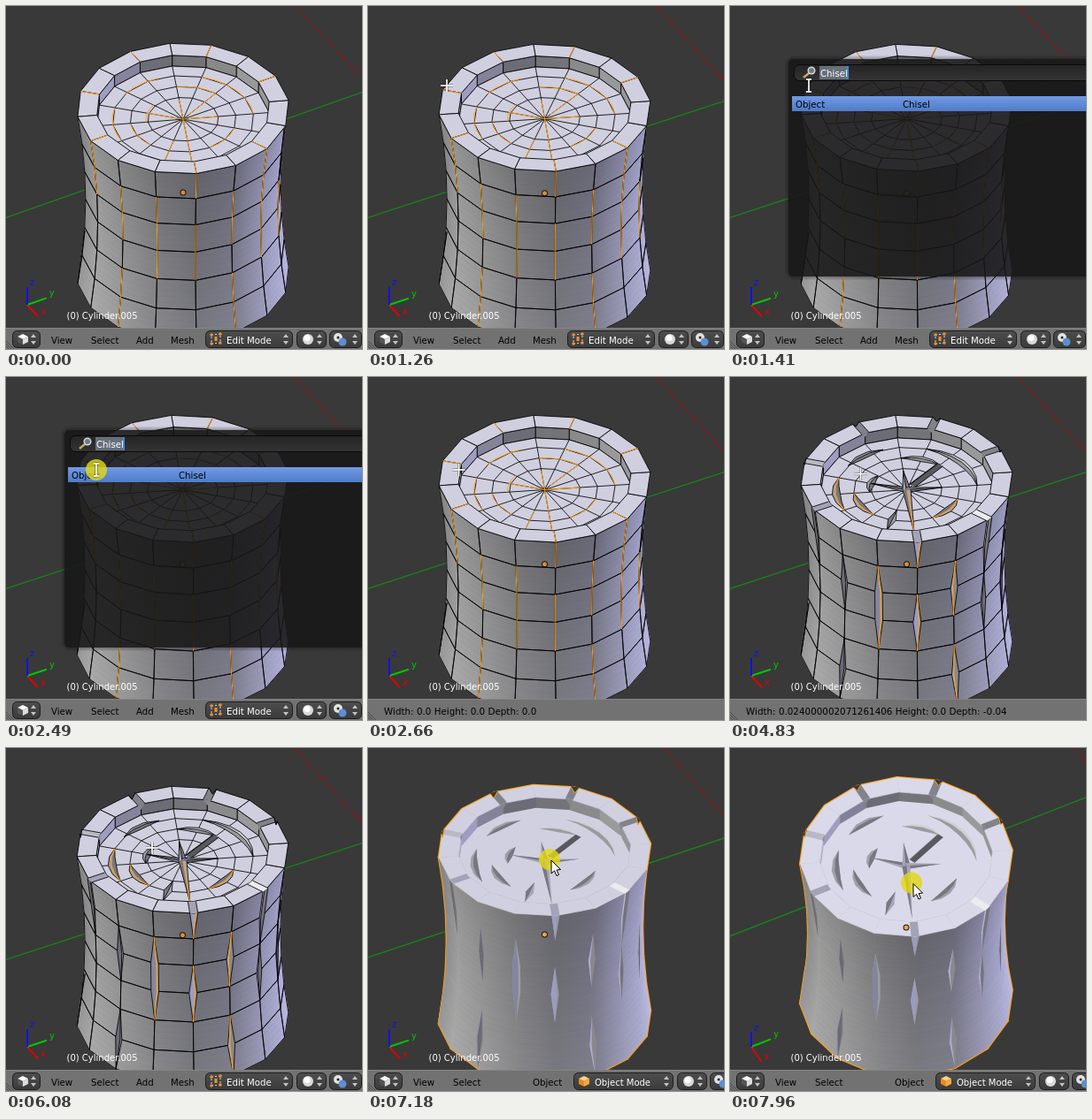
An HTML page with a canvas that plays this animation: 402 by 388 pixels, repeating every 8000 ms.

```html
<!DOCTYPE html>
<html lang="en">
<head>
<meta charset="utf-8">
<title>Chisel tool</title>
<style>
html, body { margin: 0; width: 100%; height: 100%; overflow: hidden; background: #393939; }
canvas { display: block; }
</style>
</head>
<body>
<canvas id="stage" width="402" height="388"></canvas>
<script>
const g = document.getElementById('stage').getContext('2d');
const LOOP = 8000, RAD = Math.PI / 180, STEP = 22.5;
const ORANGE = '#ffa010', BG = '#393939', FONT = '"DejaVu Sans", sans-serif', WIRE = 0.85;
const TOP = 121, CAP = 105.5, INNER = 98, RIM = 120;
const CAP_RINGS = [98, 80, 60, 40];

// Selected edges: body [column, ring, ring], cap arcs [radius, column, column], cap spokes [column, r, r, flat]
const BODY = [[-3, 0, 2], [-2, 1, 3], [-2, 4, 6], [-1, 1, 4], [0, 0, 1], [0, 2, 4],
  [1, 1, 3], [1, 4, 6], [2, 0, 2], [2, 2, 4], [3, 2, 4]];
const ARCS = [[80, -7.4, -5.8], [80, 4, 7], [60, 6, 8], [80, -5, -3], [60, -4, -2], [42, -6, -4], [60, 1, 3]];
const SPOKES = [[-1, 40, 78], [-5, 0, 42], [-8, 0, 36], [4, 0, 40], [0, 0, 80], [6, 10, 60, 1]];
const RIMS = [-7, -5, 7, 5, -3, 0, 2];

// Moments at which the picture may change
const TICKS = [0];
[[150, 1090, 7], [1260, 1410, 2], [1720, 2190, 4], [2490, 2660, 2], [3120, 3900, 6], [4360, 4360, 1],
  [4830, 4980, 2], [5450, 5600, 2], [6080, 6700, 5], [7020, 7960, 7]].forEach(([a, b, n]) => {
  for (let i = 0; i < n; i++) TICKS.push(n > 1 ? a + (b - a) * i / (n - 1) : a);
});

const MOUSE = [[1260, 89, 90], [1410, 89, 90], [1720, 66, 76], [2190, 101, 105], [3120, 104, 105],
  [3580, 121, 105], [3900, 132, 107], [4980, 150, 110], [5600, 165, 113], [6080, 165, 113], [6700, 205, 123]];

// Light around the view axis: [angle, r, g, b]
const LIGHT = [[-90, 136, 136, 139], [-60, 160, 160, 160], [-30, 140, 140, 141], [-5, 116, 116, 120],
  [15, 106, 106, 116], [30, 117, 117, 133], [55, 152, 152, 186], [90, 178, 178, 222]];

const mix = (a, b, s) => a + (b - a) * s;
function track(keys, x) {
  if (x <= keys[0][0]) return keys[0].slice(1);
  for (let i = 1; i < keys.length; i++) {
    const a = keys[i - 1], b = keys[i];
    if (x <= b[0]) return a.slice(1).map((v, n) => mix(v, b[n + 1], (x - a[0]) / (b[0] - a[0])));
  }
  return keys[keys.length - 1].slice(1);
}
function shade(deg, z = 0) {
  deg = ((deg + 540) % 360) - 180;
  return 'rgb(' + track(LIGHT, deg).map(c => Math.round(c - z * 0.09)) + ')';
}

let elev, turn, sinE, cosE, cx, cy;
function setView(e, b) {
  elev = e; turn = b;
  sinE = Math.sin(e * RAD); cosE = Math.cos(e * RAD);
  cx = 200 - (29.7 - b) * 0.45;
  cy = 161.5 + 63 * cosE;
}
const angle = k => turn - STEP + STEP * k;
// Cylinder point; v shifts it sideways along the tangent
function P(r, k, z, v = 0) {
  const a = angle(k) * RAD, s = Math.sin(a), c = Math.cos(a);
  return [cx + r * s + v * c, cy - z * cosE + (r * c - v * s) * sinE];
}
const ringZ = j => TOP - 40 * j;
const ringR = j => 111 + 9 * ((j - 3) / 3) ** 2;
const B = (j, k, v) => P(ringR(j), k, ringZ(j), v);
const circle = (r, z) => Array.from({ length: 16 }, (_, k) => P(r, k, z));

function trace(pts, closed = true) {
  g.beginPath();
  pts.forEach(p => g.lineTo(p[0], p[1]));
  if (closed) g.closePath();
}
function fill(pts, color) { trace(pts); g.fillStyle = color; g.fill(); }
function line(pts, color, w = 1, closed = false) {
  trace(pts, closed);
  g.strokeStyle = color; g.lineWidth = w; g.stroke();
}
const wire = (pts, closed) => line(pts, '#000', WIRE, closed);
function disc(x, y, r, color) {
  g.beginPath(); g.arc(x, y, r, 0, 7); g.fillStyle = color; g.fill();
}
function text(s, x, y, color, size = 10.2) {
  g.font = size + 'px ' + FONT; g.fillStyle = color; g.fillText(s, x, y);
}

function axes() {
  const b = turn * RAD, w = (turn + 22.1) * RAD;
  const ox = cx + 345 * Math.cos(w), oy = cy + 64 * cosE - 345 * Math.sin(w) * sinE;
  const along = (dx, dy, color) => line([[ox - 900 * dx, oy - 900 * dy], [ox + 900 * dx, oy + 900 * dy]], color, 1.2);
  along(Math.cos(b), -Math.sin(b) * sinE, '#148a14');
  g.setLineDash([16, 4]);
  along(Math.sin(b), Math.cos(b) * sinE, '#8e1416');
  g.setLineDash([]);
}

// Groove between two edges with a two-tone floor split along mid
function groove(left, mid, right, dark, light, edit, glow) {
  fill(left.concat(right.slice().reverse()), light);
  fill(left.concat(mid.slice().reverse()), dark);
  if (!edit) return;
  wire(left); wire(right);
  line(mid, glow ? ORANGE : '#000', glow ? 1.2 : WIRE);
}
// at(i, v) gives point i moved sideways by v
function sliver(n, at, width, skew, dark, light, edit, glow) {
  const row = f => Array.from({ length: n }, (_, i) => at(i, width(i) * f));
  groove(row(-1), row(skew), row(1), dark, light, edit, glow);
}

function drawCap(s, top) {
  const lip = circle(INNER, TOP), flush = s.d < 0.5;
  g.save();
  trace(lip); g.clip();
  for (let k = 0; k < 16; k++) {
    const tone = shade(angle(k) + 180 + STEP / 2);
    const q = [P(INNER, k, TOP), P(INNER, k + 1, TOP), P(INNER, k + 1, CAP), P(INNER, k, CAP)];
    fill(q, tone);
    line(q, s.edit ? '#000' : tone, s.edit ? WIRE : 0.6, true);
  }
  fill(circle(INNER, CAP), top);
  if (s.edit) {
    CAP_RINGS.forEach(r => wire(circle(r, CAP), true));
    for (let k = 0; k < 16; k++) wire([P(0, 0, CAP), P(INNER, k, CAP)]);
  }
  ARCS.forEach(([r, a, b]) => {
    const n = Math.round((b - a) * 2) + 1, kAt = i => mix(a, b, i / (n - 1));
    if (!s.w) return line(Array.from({ length: n }, (_, i) => P(r, kAt(i), CAP)), ORANGE);
    const pale = a > 3, tones = flush ? ['#a9a8b4', '#bab9c6'] : pale ? ['#9a9aa0', '#cfcfd2'] : ['#77777f', '#a0a0ac'];
    sliver(n, (i, v) => P(r + v, kAt(i), CAP), i => s.w * Math.sin(Math.PI * i / (n - 1)),
      0.2, ...tones, s.edit, flush || (!pale && a > -6));
  });
  SPOKES.forEach(([k, a, b, flat]) => {
    if (!s.w) return line([P(a, k, CAP), P(b, k, CAP)], ORANGE);
    const w = i => flat ? s.w * 0.9 : a ? (i === 1 ? s.w : 0) : s.w * (1 - i / 2);
    const tones = flush ? ['#a9a8b4', '#bab9c6'] : [flat ? '#58585e' : '#77777f', '#a5a5b8'];
    sliver(3, (i, v) => P(mix(a, b, i / 2), k, CAP, v), w, flat ? 0.8 : 0.1, ...tones, s.edit, flush || !k);
  });
  g.restore();
}

function rimTone(k, cut) {
  if (!cut) return '#bab9c6';
  if (k === 2) return '#ebebf0';
  if (k === -5) return '#b9b9c4';
  return Math.abs(k) > 3 ? '#82828a' : '#a3a3b8';
}
function drawRim(s, top) {
  for (let k = 0; k < 16; k++) {
    const q = [P(RIM, k, TOP), P(RIM, k + 1, TOP), P(INNER, k + 1, TOP), P(INNER, k, TOP)];
    fill(q, top);
    line(q, s.edit ? '#000' : top, s.edit ? WIRE : 0.7, true);
  }
  RIMS.forEach(k => {
    const far = Math.cos(angle(k) * RAD) < 0, w = s.w;
    if (!w) return line([P(RIM, k, TOP), P(INNER, k, TOP)], ORANGE);
    const end = (r, v) => P(r, k, TOP, v);
    const drop = TOP - 8 * s.d;
    fill([end(RIM, -w), end(RIM, w), end(INNER, w), end(INNER, -w)], rimTone(k, s.d));
    if (s.d && far) {
      const bite = [end(RIM, -w), P(RIM, k, drop), end(RIM, w)];
      fill([end(INNER, -w), P(INNER, k, drop), end(INNER, w)], '#85858e');
      fill(bite, BG);
      line([end(RIM, -w), end(RIM, w)], BG, 2);
      line(bite, s.edit ? '#000' : ORANGE);
    }
    if (s.edit) {
      [-w, w].forEach(v => wire([end(RIM, v), end(INNER, v)]));
      if (s.d < 0.5) line([end(RIM, 0), end(INNER, 0)], ORANGE, 1.2);
    }
  });
}

// Horizontal gradient in thin strips, so the light also runs smoothly down the side
function drawQuad(j, k) {
  const n = 5;
  for (let i = 0; i < n; i++) {
    const a = j + i / n, b = a + 1 / n, at = (y, x) => {
      const p = B(j, x), q = B(j + 1, x);
      return [mix(p[0], q[0], y - j), mix(p[1], q[1], y - j)];
    };
    const q = [at(a, k), at(a, k + 1), at(b, k + 1), at(b, k)], z = ringZ((a + b) / 2);
    const paint = g.createLinearGradient((q[0][0] + q[3][0]) / 2, 0, (q[1][0] + q[2][0]) / 2, 0);
    paint.addColorStop(0, shade(angle(k), z));
    paint.addColorStop(1, shade(angle(k + 1), z));
    fill(q, paint);
    line(q, paint, 0.7, true);
  }
}

function drawBody(s) {
  const quads = [];
  for (let j = 5; j >= 0; j--) for (let k = -8; k < 8; k++) {
    const q = [B(j, k), B(j, k + 1), B(j + 1, k + 1), B(j + 1, k)];
    const [a, , c] = q, area = (c[0] - a[0]) * (q[3][1] - q[1][1]) - (c[1] - a[1]) * (q[3][0] - q[1][0]);
    if (area > 0) quads.push([q, j, k]);
  }
  if (!s.edit) {
    quads.forEach(([q]) => line(q, ORANGE, 2.8, true));
    line(circle(RIM, TOP), ORANGE, 2.8, true);
  }
  quads.forEach(([, j, k]) => drawQuad(j, k));
  if (s.edit) quads.forEach(([q]) => wire(q, true));
  BODY.forEach(([k, a, b]) => {
    const n = b - a + 1, deg = angle(k), side = k > 0 ? -1 : 1;
    if (!s.w) return line(Array.from({ length: n }, (_, i) => B(a + i, k)), ORANGE);
    const width = i => (i > 0 && i < n - 1) || (i === 0 && a === 0) ? s.w : 0;
    const main = s.d ? shade(deg + 62 * side, 60) : shade(deg, 80);
    const other = s.d ? shade(deg - 50 * side, -40) : shade(deg, 20);
    // once cut deep, the floor shows only when seen head-on
    const glow = s.d < 0.5 || Math.abs(deg) < 35;
    sliver(n, (i, v) => B(a + i, k, v), width, side * 0.45,
      side > 0 ? main : other, side > 0 ? other : main, s.edit, glow);
  });
}

function gizmo() {
  const b = turn * RAD, x = 24, y = 338, n = 25;
  [['x', Math.sin(b), Math.cos(b) * sinE, '#e00000'],
    ['y', Math.cos(b), -Math.sin(b) * sinE, '#00c800'],
    ['z', 0, -cosE, '#1010f8']].forEach(([name, dx, dy, color]) => {
    line([[x, y], [x + n * dx, y + n * dy]], color, 2);
    text(name, x + n * dx + 3, y + n * dy - 2, color, 10);
  });
}

function box(x, y, w, h, r, top, bottom, edge) {
  const paint = g.createLinearGradient(0, y, 0, y + h);
  paint.addColorStop(0, top); paint.addColorStop(1, bottom);
  g.beginPath(); g.roundRect(x, y, w, h, r);
  g.fillStyle = paint; g.fill();
  if (edge) { g.strokeStyle = edge; g.lineWidth = 1; g.stroke(); }
}
function button(x, w) {
  box(x + 0.5, 367.5, w, 19, 5, '#4d4d4d', '#3b3b3b', '#1d1d1d');
  const ax = x + w - 7;
  fill([[ax - 3, 375], [ax + 3, 375], [ax, 371]], '#c4c4c4');
  fill([[ax - 3, 379], [ax + 3, 379], [ax, 383]], '#c4c4c4');
}
function cube(x, y, r, a, b, c) {
  const h = r / 2;
  fill([[x, y - r], [x + r, y - h], [x, y], [x - r, y - h]], a);
  fill([[x - r, y - h], [x, y], [x, y + r], [x - r, y + h]], b);
  fill([[x + r, y - h], [x, y], [x, y + r], [x + r, y + h]], c);
}
function header(s) {
  g.fillStyle = '#727272'; g.fillRect(0, 364, 402, 24);
  g.fillStyle = '#858585'; g.fillRect(0, 364, 402, 1);
  for (let i = 0; i < 3; i++) line([[0, 379 + i * 3], [9 - i * 3, 388]], '#4e4e4e');
  if (s.op) return text(s.op, 18, 382, '#000', 10.36);
  button(7, 31);
  cube(19, 377, 6, '#fff', '#555', '#ddd');
  text('View', 51, 382, '#000');
  text('Select', 96, 382, '#000');
  if (s.edit) text('Add', 147, 382, '#000');
  text(s.edit ? 'Mesh' : 'Object', 186, 382, '#000');
  const x = s.edit ? 225 : 232, w = s.edit ? 98 : 112;
  button(x, w);
  if (s.edit) {
    const q = [[232, 372], [242, 371], [242, 381], [232, 382]];
    g.setLineDash([2, 2]);
    line(q, '#d8d8d8', 1, true);
    g.setLineDash([]);
    q.forEach(p => disc(p[0], p[1], 1.7, '#f09030'));
    line([[237, 374], [237, 379]], '#f09030', 3);
  } else cube(244, 377, 6, '#ffd08a', '#e88a20', '#f7a840');
  text(s.edit ? 'Edit Mode' : 'Object Mode', x + 24, 382, '#fff', s.edit ? 10.2 : 10);
  const sx = x + w + 5;
  button(sx, 33);
  disc(sx + 13, 377, 6, '#d9d9d9'); disc(sx + 12, 375.5, 3.5, '#fff');
  button(sx + 37, 36);
  disc(sx + 47, 375, 5, '#e4e4e4');
  disc(sx + 52, 380, 4.5, '#5c8fd0'); disc(sx + 47, 375, 1.5, '#222');
}

function popup() {
  for (let i = 4; i > 0; i--) box(66 - i, 60 - i, 400, 246 + 2 * i, 6 + i, 'rgba(0,0,0,.07)', 'rgba(0,0,0,.07)');
  box(66, 60, 400, 246, 5, 'rgba(24,24,24,.85)', 'rgba(24,24,24,.85)');
  box(72.5, 66.5, 400, 18, 6, '#242424', '#343434', '#0a0a0a');
  line([[83, 81], [89, 76]], '#c9a265', 2.5);
  disc(92, 73, 4.5, '#d8d8d8'); disc(92, 73, 3, '#6c7a86');
  g.fillStyle = '#66707c'; g.fillRect(101, 68, 32, 15);
  g.fillStyle = '#3f85e0'; g.fillRect(132, 68, 2, 15);
  text('Chisel', 102, 80, '#fff');
  box(70, 102, 400, 17, 0, '#7299e4', '#4f7cc8');
  text('Object', 74, 115, '#000');
  text('Chisel', 195, 115, '#000');
}

function pointer(s) {
  if (!s.mouse) return;
  const [x, y] = s.mouse;
  if (s.press) disc(x, y, 12, 'rgba(226,216,22,.82)');
  if (s.arrow) {
    const p = [[0, 0], [0, 15], [3.5, 11.8], [6, 17.5], [8.5, 16.4], [6, 11], [10.5, 10.5]].map(([a, b]) => [x + 2 + a, y + 1 + b]);
    fill(p, '#fff'); line(p, '#000', 1, true);
    return;
  }
  const bars = s.beam
    ? [[[x, y - 7], [x, y + 7]], [[x - 3, y - 7], [x + 3, y - 7]], [[x - 3, y + 7], [x + 3, y + 7]]]
    : [[[x - 7, y], [x + 7, y]], [[x, y - 7], [x, y + 7]]];
  bars.forEach(b => line(b, 'rgba(0,0,0,.5)', 3));
  bars.forEach(b => line(b, '#fff', 1.7));
}

function state(t) {
  const s = { edit: t < 6540, w: 0, d: 0 };
  if (t < 1260) {
    const u = Math.min(1, t / 1090), k = u * u * (3 - 2 * u);
    setView(mix(38.2, 37, k), mix(29.7, 28.6, k));
  } else {
    const k = t < 7000 ? 0 : ((t - 6860) / 1100) ** 1.83;
    setView(37 + 11.8 * k, 28.6 - 1.2 * k);
    s.mouse = track(MOUSE, t);
    s.mouse[1] += 29.5 * k;
  }
  s.popup = t >= 1400 && t < 2650;
  s.beam = s.popup;
  s.arrow = !s.edit;
  s.press = (t >= 2480 && t < 2650) || t >= 7000;
  if (t >= 2650) {
    const px = Math.max(0, Math.min(24, Math.round(s.mouse[0] - 102)));
    s.w = t < 3100 ? 0 : px / 19 * 3.6;
    s.d = t < 4350 ? 0 : t < 4820 ? 0.4 : t < 4970 ? 0.7 : 1;
    if (t < 5590) {
      const width = t < 3100 ? '0.0' : Math.fround(px * 0.001 + 1.25e-9);
      s.op = 'Width: ' + width + ' Height: 0.0 Depth: ' + (s.d ? '-0.04' : '0.0');
    }
  }
  return s;
}

function draw(now) {
  let t = 0;
  for (const tick of TICKS) if (tick - 15 <= now % LOOP) t = tick;
  const s = state(t), lift = (elev - 38) * 0.8;
  const top = 'rgb(' + [209, 208, 224].map(c => Math.round(c + lift)) + ')';
  g.lineJoin = 'round';
  g.fillStyle = BG; g.fillRect(0, 0, 402, 388);
  axes();
  drawBody(s);
  drawCap(s, top);
  drawRim(s, top);
  disc(cx, cy, 3.5, '#1a1208'); disc(cx, cy, 2.5, s.edit ? '#dd8a3c' : '#e8a850');
  gizmo();
  if (s.popup) popup();
  text('(0) Cylinder.005', 68.5, 354, '#fff', 10);
  header(s);
  pointer(s);
}

const start = performance.now();
function loop() {
  draw(performance.now() - start);
  requestAnimationFrame(loop);
}
loop();
</script>
</body>
</html>
```
